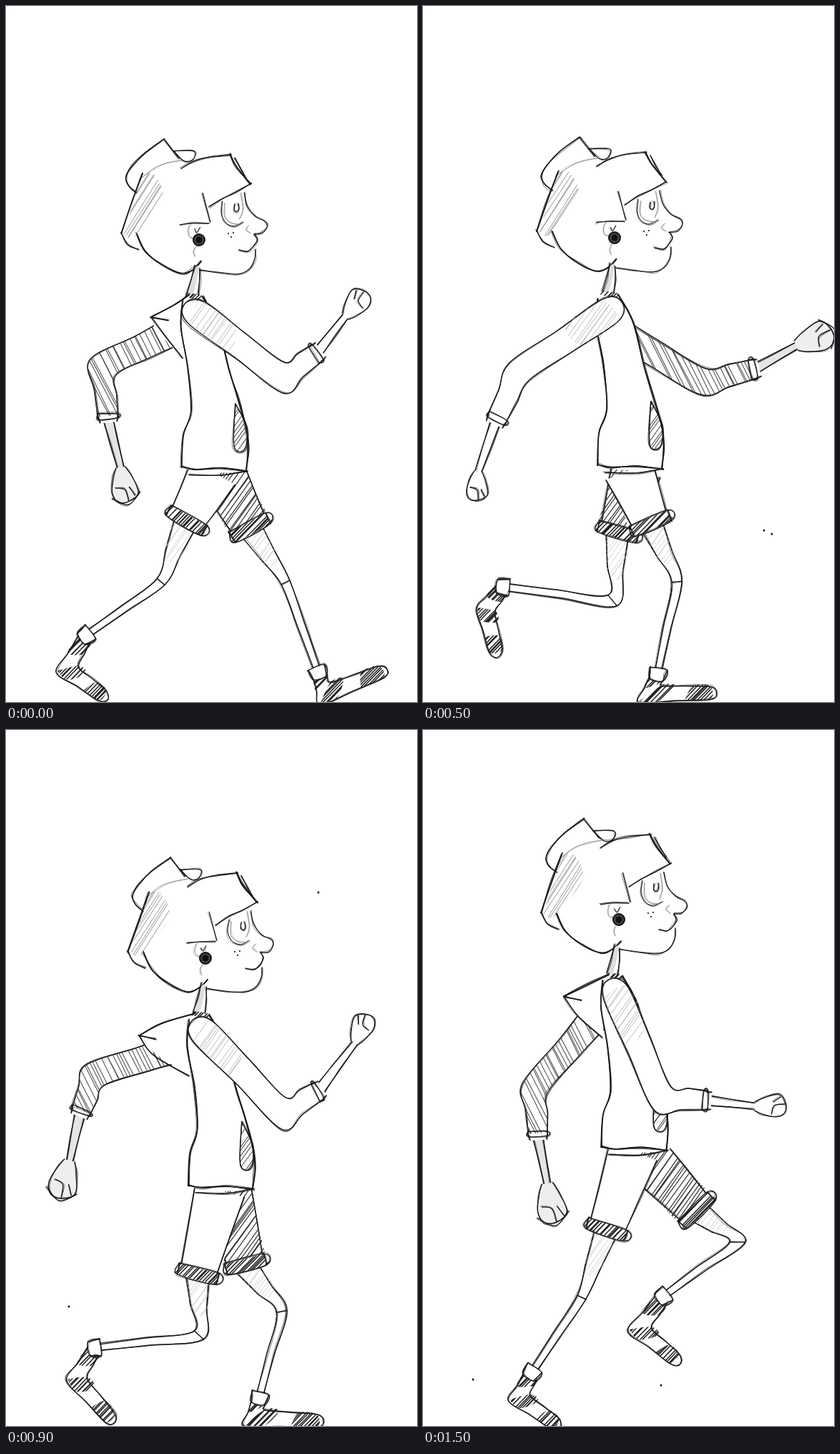
An HTML page with a canvas that plays this animation: 575 by 973 pixels, repeating every 1600 ms.

```html
<!DOCTYPE html>
<html lang="en">
<head>
<meta charset="utf-8">
<title>Walk cycle</title>
<style>
html, body { margin: 0; width: 100%; height: 100%; overflow: hidden; background: #fff; }
canvas { display: block; }
</style>
</head>
<body>
<canvas id="stage" width="575" height="973"></canvas>
<script>
const STEP = 100, STEPS = 16;

// Key poses by step. Arm: elbow, cuff, wrist, fingertips. Leg: shorts cuff, knee, ankle, heel, toe.
const keys = {
  0: { head: [0, 0], hood: 203,
    nearArm: '388,520 436,484 475,434 503,402', farArm: '136,505 143,577 160,645 168,692',
    nearLeg: '251,722 217,805 112,880 86,928 135,964', farLeg: '343,732 391,806 437,932 447,962 525,931' },
  2: { head: [9, -24], hood: 199,
    nearArm: '238,545 276,614 331,663 371,677', farArm: '280,535 300,590 305,640 300,672',
    nearLeg: '305,717 337,803 212,756 163,765 182,826', farLeg: '264,718 240,808 199,933 190,966 268,971' },
  5: { head: [-2, -3], hood: 0, specks: '477,733 488,738',
    nearArm: '135,511 102,580 77,651 74,690', farArm: '392,525 465,507 522,475 571,457',
    nearLeg: '320,726 355,805 328,934 318,962 402,960', farLeg: '272,738 265,831 112,812 88,845 102,902' },
  7: { head: [3, -62], hood: 179, specks: '429,170',
    nearArm: '155,490 154,567 163,641 174,678', farArm: '335,523 412,520 478,515 531,508',
    nearLeg: '247,696 212,774 132,880 113,918 180,964', farLeg: '350,660 438,713 310,780 289,812 342,861' },
  9: { head: [9, -8], hood: 177, specks: '437,227 88,806',
    nearArm: '388,536 438,504 488,437 506,400', farArm: '125,482 104,535 89,602 74,652',
    nearLeg: '268,763 270,846 124,864 99,908 146,962', farLeg: '336,750 386,813 354,934 348,962 435,966' },
  11: { head: [-3, -72], hood: 178, specks: '190,73 425,163 540,543',
    nearArm: '143,480 150,548 161,606 182,653', farArm: '325,535 355,533 421,525 473,522',
    nearLeg: '374,663 452,694 323,776 312,830 382,861', farLeg: '258,690 246,766 185,888 170,925 215,968' },
  15: { head: [4, -62], hood: 193, specks: '70,908 333,916',
    nearArm: '335,515 398,518 464,526 506,526', farArm: '157,500 161,568 174,634 182,687',
    nearLeg: '256,701 222,793 152,898 135,934 185,970', farLeg: '385,674 440,716 336,792 303,838 353,880' }
};

const ctx = document.getElementById('stage').getContext('2d');
let seed;
const wobble = a => ((seed = seed * 16807 % 2147483647) / 2147483647 * 2 - 1) * a;
const pts = text => text.split(' ').map(p => p.split(',').map(Number));
const mix = (a, b, t) => [a[0] + (b[0] - a[0]) * t, a[1] + (b[1] - a[1]) * t];
const unit = (a, b) => {
  const d = Math.hypot(b[0] - a[0], b[1] - a[1]) || 1;
  return [(b[0] - a[0]) / d, (b[1] - a[1]) / d];
};
const move = (p, d, n) => [p[0] + d[0] * n, p[1] + d[1] * n];

// Smooth line through the points.
function trace(p) {
  ctx.beginPath();
  ctx.moveTo(...p[0]);
  for (let i = 1; i < p.length; i++) {
    const a = p[i - 1], b = p[i], o = p[i - 2] || a, n = p[i + 1] || b;
    ctx.bezierCurveTo(a[0] + (b[0] - o[0]) / 6, a[1] + (b[1] - o[1]) / 6,
      b[0] - (n[0] - a[0]) / 6, b[1] - (n[1] - a[1]) / 6, ...b);
  }
}

// One firm stroke and two loose ones over it.
function ink(line, width = 1.4, color = '#1a1a1a') {
  const p = typeof line === 'string' ? pts(line) : line;
  ctx.strokeStyle = color;
  for (const [share, slip] of [[1, 0.4], [0.6, 1.4], [0.4, 2]]) {
    ctx.lineWidth = width * share;
    trace(p.map(([x, y]) => [x + wobble(slip), y + wobble(slip)]));
    ctx.stroke();
  }
}
const faint = line => ink(line, 0.7, '#777');

function fill(p, color = '#fff') {
  trace(p);
  ctx.fillStyle = color;
  ctx.fill();
}

function hatch(p, gap = 5, width = 1, color = '#444', angle = -0.95) {
  ctx.save();
  trace(p);
  ctx.clip();
  ctx.translate(...p[0]);
  ctx.rotate(angle);
  ctx.strokeStyle = color;
  ctx.lineWidth = width;
  ctx.beginPath();
  for (let y = -200; y < 200; y += gap) {
    ctx.moveTo(-200, y + wobble(gap));
    ctx.lineTo(200, y + wobble(gap));
  }
  ctx.stroke();
  ctx.restore();
}
const scribble = p => hatch(p, 2.8, 1.5, '#222', -0.8);

// The two edges of a limb, mitred at its joints.
function edges(joints, widths) {
  const sides = [1, -1].map(side => joints.map((p, i) => {
    const a = unit(joints[i - 1] || p, joints[i - 1] ? p : joints[1]);
    const b = joints[i + 1] ? unit(p, joints[i + 1]) : a;
    const n = unit([0, 0], [-a[1] - b[1], a[0] + b[0]]);
    const miter = Math.max(0.6, -n[0] * a[1] + n[1] * a[0]);
    return move(p, n, side * widths[i] / 2 / miter);
  }));
  return sides.map(s => s.flatMap((p, i) => i ? [mix(s[i - 1], p, 0.5), p] : [p]));
}

function at(side, t) {
  const u = t * (side.length - 1), i = Math.min(Math.floor(u), side.length - 2);
  return mix(side[i], side[i + 1], u - i);
}
const band = ([l, r], from, to) => [at(l, from), at(l, to), at(r, to), at(r, from), at(l, from)];

// A limb with open ends, or one end closed by a round cap.
function tube(joints, widths, cap) {
  const both = edges(joints, widths), [l, r] = both;
  const last = joints.length - 1;
  let outline = [...l, ...[...r].reverse()];
  if (cap === 'start') {
    const tip = move(joints[0], unit(joints[1], joints[0]), widths[0] / 2);
    outline = [...[...l].reverse(), tip, ...r];
  } else if (cap === 'end') {
    const tip = move(joints[last], unit(joints[last - 1], joints[last]), widths[last] / 2);
    outline = [...l, tip, ...[...r].reverse()];
  }
  fill(outline);
  if (cap) ink(outline); else both.forEach(side => ink(side));
  return { both, outline };
}

function hand(wrist, tip, far) {
  const [x, y] = unit(wrist, tip), size = Math.hypot(tip[0] - wrist[0], tip[1] - wrist[1]);
  const place = text => pts(text).map(([u, v]) =>
    [wrist[0] + (x * u - y * v) * size, wrist[1] + (y * u + x * v) * size]);
  const fist = place('0,-.14 .3,-.28 .8,-.4 1.03,-.1 1,.22 .7,.36 .25,.26 0,.14');
  fill(fist, far ? '#eee' : '#fff');
  ink(fist, 1.3);
  ink(place('1,-.08 .66,-.02 .58,.24'), 1.2);
  ink(place('.88,-.3 .62,-.16'), 1.2);
  if (far) ink(place('.8,-.45 1.12,-.05 .85,.4'), 1.2);
}

function arm(shoulder, [elbow, cuff, wrist, tip], far) {
  const fore = tube([cuff, wrist], [14, 9]);
  if (far) fill(fore.outline, 'rgba(0,0,0,.1)');
  hand(wrist, tip, far);
  const sleeve = tube([shoulder, elbow, cuff], [38, 35, 27], 'start');
  if (far) hatch(sleeve.outline, 5.5, 1, '#444', 1.1);
  else hatch(band(sleeve.both, 0, 0.2), 5, 0.6, '#999');
  const dir = unit(elbow, cuff);
  tube([move(cuff, dir, -4), move(cuff, dir, 5)], [27, 24]);
  ink(band(sleeve.both, 0.95, 1), 1.2);
}

function leg(hip, [cuff, knee, ankle, heel, toe], far) {
  const limb = tube([cuff, knee, ankle], [32, 13, 9]);
  hatch(band(limb.both, 0, 0.3), 4.5, 0.6, '#bbb');
  const [l, r] = limb.both;
  ink([l[2], r[2]], 1.2);

  const foot = tube([ankle, heel, toe], [18, 24, 18], 'end');
  for (const [from, to] of [[0.05, 0.26], [0.48, 0.63], [0.82, 1]]) scribble(band(foot.both, from, to));
  const shin = unit(knee, ankle);
  const sock = tube([move(ankle, shin, -8), move(ankle, shin, 8)], [24, 19]);
  ink(band(sock.both, 0, 1), 1.2);

  const shorts = tube([hip, cuff], [70, 50]);
  if (far) hatch(shorts.outline, 4.5, 1.2, '#333');
  const dir = unit(hip, cuff);
  const hem = tube([move(cuff, dir, -11), move(cuff, dir, 5)], [58, 56]);
  scribble(hem.outline);
  ink(band(hem.both, 0, 1), 1.2);
}

function torso() {
  const back = pts('247,412 245,450 254,505 259,566 248,600 246,645');
  const front = pts('275,406 296,445 312,508 325,550 336,590 339,620 336,650');
  fill([...back, ...[...front].reverse()]);
  ink(back, 1.7);
  ink(front, 1.9);
  ink('246,644 265,648 300,646 338,650', 1.8);
  ink('256,655 300,656 336,650');
  const pocket = pts('321,556 319,616 334,620 337,590 321,556');
  hatch(pocket);
  ink(pocket);
}

function hood(x) {
  ink([[256, 404], [x + 32, 418], [x, 435]], 1.9);
  ink([[x, 435], [x + 24, 440]], 1.6);
  ink([[x, 435], [x + 20, 462], [247, 492]], 1.5);
}

function head() {
  // hat
  ink('183,261 172,252 168,240 176,225 194,206 221,186', 1.6);
  ink('221,186 242,213');
  ink('234,203 263,203 261,215 249,217 235,203', 1.2);
  faint('187,242 207,227 225,220 246,216');
  // hair
  ink('245,227 262,217 285,211 315,208');
  ink('313,207 322,224 342,249', 2);
  ink('320,212 330,230 336,240');
  ink('343,248 322,260 303,269 284,281');
  ink('275,262 286,302', 1.1);
  ink('244,306 262,304 284,304', 1.2);
  ink('191,234 175,278 161,318', 1.7);
  ink('161,316 170,333 186,341');
  ink('183,318 195,343 218,362 245,374 262,368 273,357', 1.7);
  hatch(pts('190,238 206,235 219,270 180,322 164,318'), 4.5, 0.8, '#888', -1);
  // ear
  faint('258,306 255,313 256,322 264,325');
  ink('264,312 267,317 271,310', 1);
  faint('266,336 263,343 265,350');
  // profile
  ink('272,369 300,373 325,375 340,368 348,354 349,340', 1.2);
  ink('326,341 338,343 346,336 351,327 347,319');
  ink('333,261 338,280 349,294 362,301 365,309 358,318 347,319', 1.2);
  faint('340,307 336,313 342,318');
  // eye and freckles
  ink('303,273 301,290 307,303 319,308 331,302', 1);
  faint('306,276 306,294 314,303 326,305');
  ink('320,277 319,285 323,288 326,283 325,276', 1.2);
  faint('328,262 331,284 327,298');
  for (const p of pts('311,318 318,317 315,323')) dot(p, 1.1);
  // neck
  fill(pts('264,366 270,366 262,402 255,402'), '#ddd');
  ink('264,362 259,382 253,402');
  ink('271,367 271,385 269,404');
  scribble(pts('252,401 273,404 272,410 250,407'));
  // earring
  dot([270, 327], 8, '#444');
  dot([270, 327], 4.5);
  ctx.strokeStyle = '#111';
  ctx.lineWidth = 2;
  ctx.beginPath();
  ctx.arc(270, 327, 8, 0, 7);
  ctx.stroke();
}

function dot([x, y], r, color = '#111') {
  ctx.fillStyle = color;
  ctx.beginPath();
  ctx.arc(x, y, r, 0, 7);
  ctx.fill();
}

// A stride is 8 steps; half a stride later the sides trade places.
function poseAt(i) {
  const same = keys[i] || keys[(i + 8) % STEPS];
  if (same) return same;
  const k = keys[i % 8 - 4];
  return { ...k, nearArm: k.farArm, farArm: k.nearArm, nearLeg: k.farLeg, farLeg: k.nearLeg };
}

function draw(i) {
  const pose = poseAt(i), [x, y] = pose.head;
  const shift = parts => {
    ctx.save();
    ctx.translate(x, y);
    parts();
    ctx.restore();
  };
  seed = 4711 + i * 97;
  ctx.fillStyle = '#fff';
  ctx.fillRect(0, 0, 575, 973);
  ctx.lineCap = ctx.lineJoin = 'round';
  arm([252 + x, 446 + y], pts(pose.farArm), true);
  leg([300 + x, 652 + y], pts(pose.farLeg), true);
  leg([290 + x, 652 + y], pts(pose.nearLeg), false);
  shift(() => {
    if (pose.hood) {
      fill([[256, 404], [pose.hood, 435], [247, 492]]);
      hood(pose.hood);
    }
    torso();
    head();
  });
  arm([265 + x, 428 + y], pts(pose.nearArm), false);
  if (keys[i] && pose.specks) pts(pose.specks).forEach(p => dot(p, 1.5));
}

let shown = -1;
function tick() {
  const now = Math.floor(performance.now() / STEP) % STEPS;
  if (now !== shown) draw(shown = now);
  requestAnimationFrame(tick);
}
tick();
</script>
</body>
</html>
```
